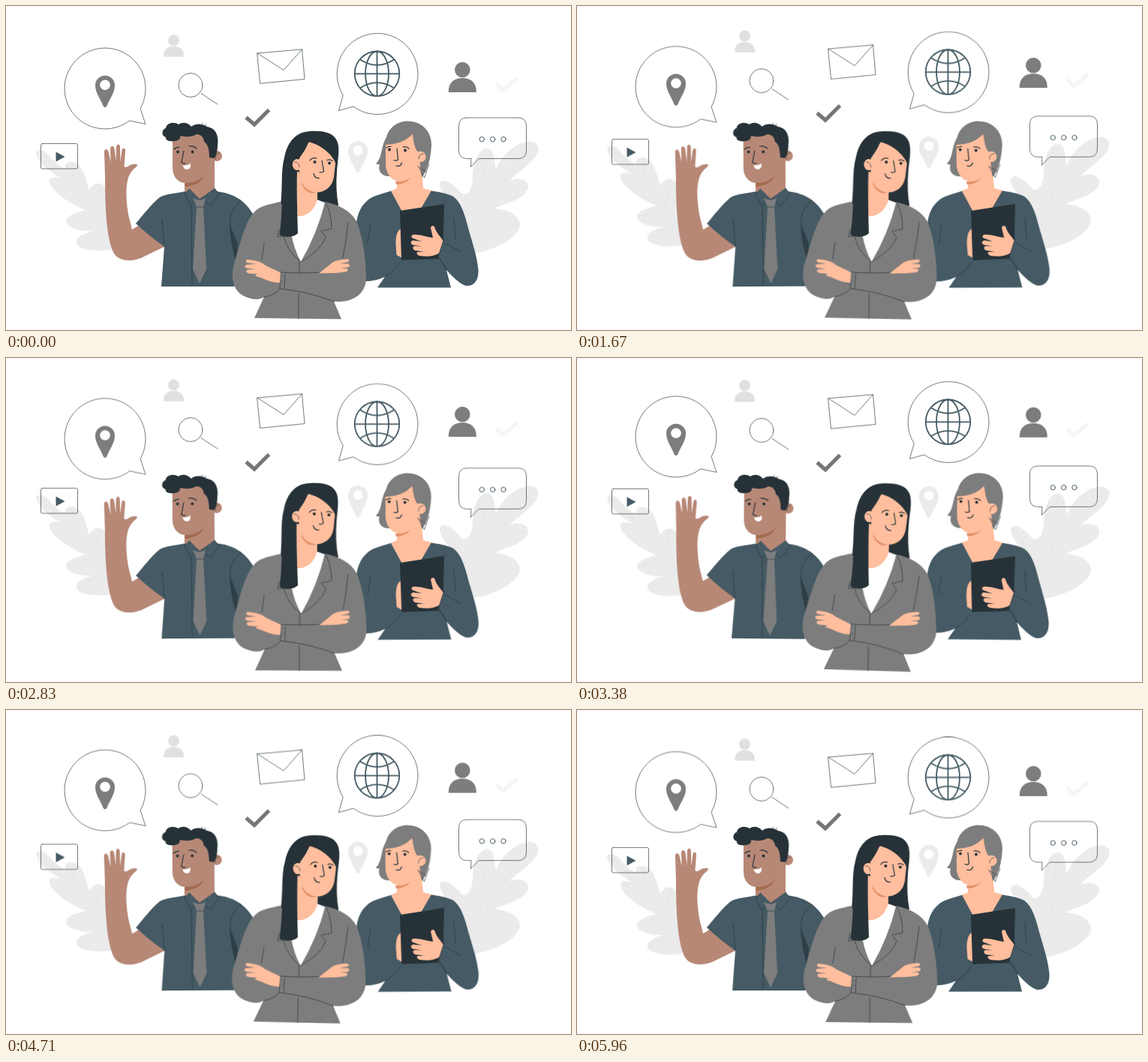
Recreate the animation shown at these times as an HTML page. Size 753x432 px, loop 6 s.

```html
<!DOCTYPE html>
<html lang="en">
<head>
<meta charset="utf-8">
<title>Team</title>
<style>
  html, body { margin: 0; width: 100%; height: 100%; overflow: hidden; background: #fff; }
  svg { display: block; width: 100vw; height: 100vh; }
  path, circle, ellipse, rect { stroke-linecap: round; stroke-linejoin: round; }
  .line { fill: none; stroke: #263238; stroke-width: .65; }
  .face { fill: none; stroke: #263238; stroke-width: 1.2; }
  .globe { fill: none; stroke: #455a64; stroke-width: 1.8; }
  .tick { fill: none; stroke-width: 5; stroke-linecap: butt; stroke-linejoin: miter; }
  .dark { fill: #263238; }
  .navy { fill: #455a64; }
  .grey { fill: #7d7d7d; }
  .tan { fill: #b78876; }
  .tanShade { fill: #a36a4e; }
  .skin { fill: #ffbe9d; }
  .skinShade { fill: #e28f66; }
  .white { fill: #fff; }
  .pale { fill: #e0e0e0; }
  .leaf { fill: #ebebeb; }
  .vein { fill: none; stroke: #e5e5e5; stroke-width: .8; }
</style>
</head>
<body>
<svg viewBox="0 0 753 432" preserveAspectRatio="none" xmlns="http://www.w3.org/2000/svg">
  <defs>
    <path id="pin" d="M-13 0A13 13 0 0 1 13 0C13 10 6 18 2.5 27.500Q0 31.500-2.500 27.500C-6 18-13 10-13 0Z"/>
    <g id="user">
      <circle cy="-20" r="10.300"/>
      <path d="M-18.500 10C-19-3-11-9 0-9S19-3 18.500 10Z"/>
    </g>
  </defs>

  <g data-move="drift">
    <path class="leaf" d="M40 196C42 190 52 192 58 200C64 208 72 214 79 217C77 206 90 205 98 213C106 222 107 236 111 245C117 235 126 233 134 243L150 300L140 325C122 328 98 326 94 317C92 306 108 302 117 300C104 301 83 298 80 288C79 279 96 275 106 272C92 267 62 250 58 235C57 226 66 228 74 230C60 222 42 209 40 196Z"/>
    <path class="vein" d="M46 198Q90 235 146 308M88 234L90 215M80 230L64 234M118 272L124 242M118 273L86 286M134 294L98 315"/>
    <path class="leaf" d="M690 182C706 176 715 188 706 200C698 213 680 222 671 233C684 226 698 233 696 243C690 258 668 262 651 270C668 271 686 279 685 293C681 311 650 326 622 330L600 280C590 258 574 243 579 235C585 229 598 238 607 250C616 254 621 244 622 230C622 206 630 191 641 190C652 191 650 206 653 218C659 203 672 187 690 182Z"/>
    <path class="vein" d="M702 186Q650 240 618 318M644 252L690 240M630 280L680 292M632 273L640 196M622 300L584 238"/>
    <use href="#user" class="pale" transform="translate(223.500 60.300) scale(.73)"/>
    <use href="#user" class="grey" transform="translate(608.300 105)"/>
    <use href="#pin" class="leaf" x="469" y="193"/>
    <circle class="white" cx="469" cy="192.500" r="6.500"/>
    <path class="line" d="M335 63L394.500 57.800L398 97.500L339 103.300ZM335 63L370 85.500L394.500 57.800"/>
    <circle class="line" cx="246" cy="105.500" r="16"/>
    <path class="line" d="M260 116.500L282 131"/>
    <path class="tick" stroke="#757575" d="M320 148.500L331 158L350.500 138.500"/>
    <path class="tick" stroke="#f5f5f5" d="M653 103.500L662 112.500L681.500 96.500"/>
    <rect class="line" x="46.500" y="183.500" width="49" height="33.500" rx="2"/>
    <path class="navy" d="M66.500 194.500L78.500 201L66.500 207.500Z"/>
  </g>

  <g data-move="bob">
    <path class="line" d="M164.500 153.130A54 54 0 1 1 179 136.590L185.800 157Z"/>
    <use href="#pin" class="grey" x="132" y="105.800"/>
    <circle class="white" cx="132" cy="105.300" r="6.800"/>
    <path class="line" d="M449 118.780A54 54 0 1 1 463 134L443.800 139.300Z"/>
    <g class="globe">
      <circle cx="494.500" cy="90.300" r="29.800"/>
      <ellipse cx="494.500" cy="90.300" rx="15.500" ry="29.800"/>
      <path d="M494.500 60.500V120M464.700 90.300H524.300M472 71.500Q494.500 86 517 71.500M472 109.200Q494.500 95 517 109.200"/>
    </g>
    <path class="line" d="M630.500 203.500H682.500Q693.500 203.500 693.500 192.500V160Q693.500 149 682.500 149H614.500Q603.500 149 603.500 160V192.500Q603.500 203.500 614.500 203.500H620L619.500 214Z"/>
    <g fill="none" stroke="#455a64">
      <circle cx="634.300" cy="177.700" r="3.200"/>
      <circle cx="648.700" cy="177.700" r="3.200"/>
      <circle cx="663" cy="177.700" r="3.200"/>
    </g>
  </g>

  <g data-move="sway" data-pivot="230 264">
    <path class="tan" d="M131 195C131 190 135 190 136.500 194L139.500 208L139 190C139 186 144 186 144.500 190L146.500 207L147 188C147.500 183 152 183.500 152 188L152.500 208L154.500 192C155.500 188 159.500 189 159 194L157.500 214C162 217 164 211 170 211C175 210 177 212 173 215C168 219 165 223 163 229C160 239 160 250 161 262C162 278 166 289 168 298L178 292L211 321L180 336C168 341 151 341 144 330C133 310 132 260 132 228Z"/>
    <path class="navy" d="M173 290C183 278 194 264 205 255C214 250 228 250 239 247H280C304 250 318 259 329 277L330 330L304 374H207L211 321Q190 306 173 290Z"/>
    <path fill="#2f3f47" d="M298.500 291L309 318L307 340Q300 318 298.500 291Z"/>
    <path class="line" d="M208 285L211 321M313 260C301 268 297 282 299 300Q301 322 307 340M247 266L248 372"/>
    <path class="tan" d="M238 222V246C245 262 270 261 278 246V200Z"/>
    <path class="tanShade" d="M238.500 234Q256 235 266 222Q261 239 238.500 241Z"/>
    <path class="navy" d="M245 244L238 250L246 266L258 257ZM278 243L284 251L272 266L258 257Z"/>
    <path class="line" d="M245 244L238 250L246 266L258 257L272 266L284 251L278 243"/>
    <path class="grey" d="M249 256Q258 261 266 256L263 268L267 351L258 370L249 351L254 268Z"/>
    <path class="line" d="M254 268H263"/>
    <circle class="tan" cx="281" cy="200" r="7"/>
    <path class="line" d="M279 204Q278 197 284 196"/>
    <path class="tan" d="M222 176V215C222 229 230 236 240 236C256 236 268 227 277 206V168H225Z"/>
    <path class="dark" d="M229 179C221 182 212 180 213 175C206 173 208 164 213 163C214 155 225 154 230 158C236 153 245 157 247 161C253 156 262 157 268 161C279 162 284 173 282 185C282 194 280 200 277 203L271 202C271 191 269 184 264 181C264 175 259 171 254 171C246 176 238 174 232 173Q233 177 229 179Z"/>
    <path class="line" d="M260.500 160L262 156M264 160L266.500 157M258 162L267 160"/>
    <g class="dark"><circle cx="229" cy="194.500" r="1.900"/><circle cx="248.500" cy="194.500" r="1.900"/></g>
    <path class="face" d="M224 191Q227 187.500 231 188.500M244 187Q250 186 254 190M237 193L234 208.500Q236 210.500 239 210"/>
    <path class="white" d="M235.500 212.500Q242 213 246 210Q247 217 241 218Q237 217.500 235.500 212.500Z"/>
  </g>

  <g data-move="sway" data-pivot="547 265">
    <path class="navy" d="M515 246C500 251 488 253 481 260C469 270 464 290 468 310L478 367Q493 367 505 361L495 375.500H593L587 352C597 363 606 371 613 373C624 374 630 366 629.500 352C628 334 621 314 616 296C611 276 606 261 596 254C586 249 576 248 565 246Z"/>
    <path class="line" d="M486 290L482 316M597 283L599 312M505 361Q516 355 525 342M545 338L578 337L587 352"/>
    <path class="skin" d="M521 226V243L513 246.500L531 280L550 275L567 246L556 243L553 205Z"/>
    <path class="grey" d="M507 175C499 188 502 202 493 210Q496 212 498 211C495 220 501 227 510 227L552 230C561 223 566 205 567 185C567 165 552 153.500 535 153.500C521 153.500 510 163 507 175Z"/>
    <path class="skin" d="M521 228V243Q538 250 556 243L551 205Z"/>
    <path class="skinShade" d="M519 234Q534 235 540 226Q536 237 520 238Z"/>
    <path class="skin" d="M506 183C519 182 532 179 541 170L551 193C551 213 546 228 531 233C516 237 507 225 506 212Z"/>
    <path class="grey" d="M505 185Q531 184 542 170Q543 188 549 195L556 190L545 162L518 160Z"/>
    <circle class="skin" cx="552.500" cy="201" r="7.200"/>
    <path class="line" d="M550 204Q550 197 556 197M549 213L557.500 229L564 211M551 215L560 221"/>
    <g class="dark"><circle cx="511" cy="191.500" r="1.900"/><circle cx="532" cy="192.500" r="1.900"/></g>
    <path class="face" d="M507 189Q509 187 513 187.500M529 188Q533 186.500 537 190M521 190L522.500 205Q520 207 517 205.500M520 213Q526 215 527.500 209"/>
    <path class="skin" d="M526 297Q519 301 519.500 318L520.500 332L528 336Z"/>
    <path class="dark" d="M525 273L584 264L582 336L527 339Z"/>
    <path class="skin" d="M584 315C578 306 573 302 571 294Q567 291 566 296L569 309C560 308 550 304 542 305Q538 308 543 310L554 314L542 312.500Q537 315.500 542 318.500L554 320.500L544 320Q540 323 545 326L557 327.500L548 328Q546 331 551 333C562 335 574 333 579 328Z"/>
    <path class="navy" d="M584 308L576 334L588 352L606 340L600 312Z"/>
    <path class="line" d="M584 310L576 334L587 350M584 316L607 328"/>
  </g>

  <g data-move="swayFast" data-pivot="391 292">
    <path class="dark" d="M366 265C369 240 366 220 371 202C375 181 387 167 406 167C426 166 438 170 442 182C445 193 442 205 441 220Q439 245 443 266L420 275Z"/>
    <path class="grey" d="M366 261C352 264 342 266 335 271C319 283 313 315 305 340C298 360 302 382 320 388C330 392 338 392 344 388L331 416L447 417.500L437 394C460 396 478 386 480 365C480 340 476 308 467 287C459 273 446 266 425 261L393 341Z"/>
    <path class="white" d="M376 290L414 258L425 262Q415 303 393 341Q384 325 380 303Z"/>
    <path class="skin" d="M387 220V280C400 282 412 272 415 257V235Z"/>
    <path class="skinShade" d="M394 234Q401 247 416 247Q403 255 394 238Z"/>
    <path class="skin" d="M405 180C420 183 438 197 439 210L437 228C435 241 425 248.500 413 248.500C400 247 393 238 391 224L390 199Z"/>
    <path class="dark" d="M403 182C399 192 395 197 391 203L388 218Q387 245 389 303C383 309 370 309 364.500 305C370 270 366 230 373 200L396 174ZM403 181C418 185 431 193 440 210L442 190L425 170L400 172Z"/>
    <ellipse class="skin" cx="388" cy="211.500" rx="6.200" ry="7.500"/>
    <path class="line" d="M391 215Q391 208 385 208"/>
    <g class="dark"><circle cx="411.500" cy="208" r="2"/><circle cx="431" cy="209.500" r="2"/></g>
    <path class="face" d="M405 206Q408 201.500 414 203M428 205.500Q432 204 435 206.500M421 206L423.500 220.500Q421 222.500 418 221.500M410 223.500Q411.500 230 417.500 229.500"/>
    <path class="line" d="M364 298L362 308L370 307Q375 328 393 341Q421 325 426 308L420 300L434 297Q434 277 426 262M391 341V356M390 384V417M344 316L341 338M456 289Q453 315 449 336M366 355Q395 357 420 355M366 355L365 377Q400 380 437 394M372 357L371 377M344 388Q358 386 365 377"/>
    <path class="skin" d="M366 355.500L346 346Q338 339 322 338Q317 340 322 342.500L333 344L320 345Q316 347.500 321 349.500L333 351L322 351.500Q318 354 323 356.500L336 357.500Q330 358.500 334 360.500C345 363 350 369 365 369Z"/>
    <path class="skin" d="M417 356.500L435 342Q440 338 455 337.500Q460 339 455 341.500L445 343.500L456 343.500Q460 346 456 348.500L446 349.500L454 350Q458 352 453 354.500L440 356Z"/>
    <path class="line" d="M368 360V361M368 367V368"/>
  </g>
</svg>
<script>
  const lift = px => [0, -px, 0].map(y => ({ transform: `translateY(${y}px)` }));
  const swing = [[0, 0], [.25, 1], [.75, -1], [1, 0]]
    .map(([offset, deg]) => ({ offset, transform: `rotate(${deg}deg)` }));

  const moves = {
    drift: [lift(10.5), 6000],
    bob: [lift(10), 1500],
    sway: [swing, 3000],
    swayFast: [swing, 1500]
  };

  for (const el of document.querySelectorAll('[data-move]')) {
    const [frames, duration] = moves[el.dataset.move];
    const pivot = el.dataset.pivot;
    if (pivot) el.style.transformOrigin = pivot.split(' ').map(n => n + 'px').join(' ');
    el.animate(frames, { duration, iterations: Infinity, easing: 'linear' });
  }
</script>
</body>
</html>
```
